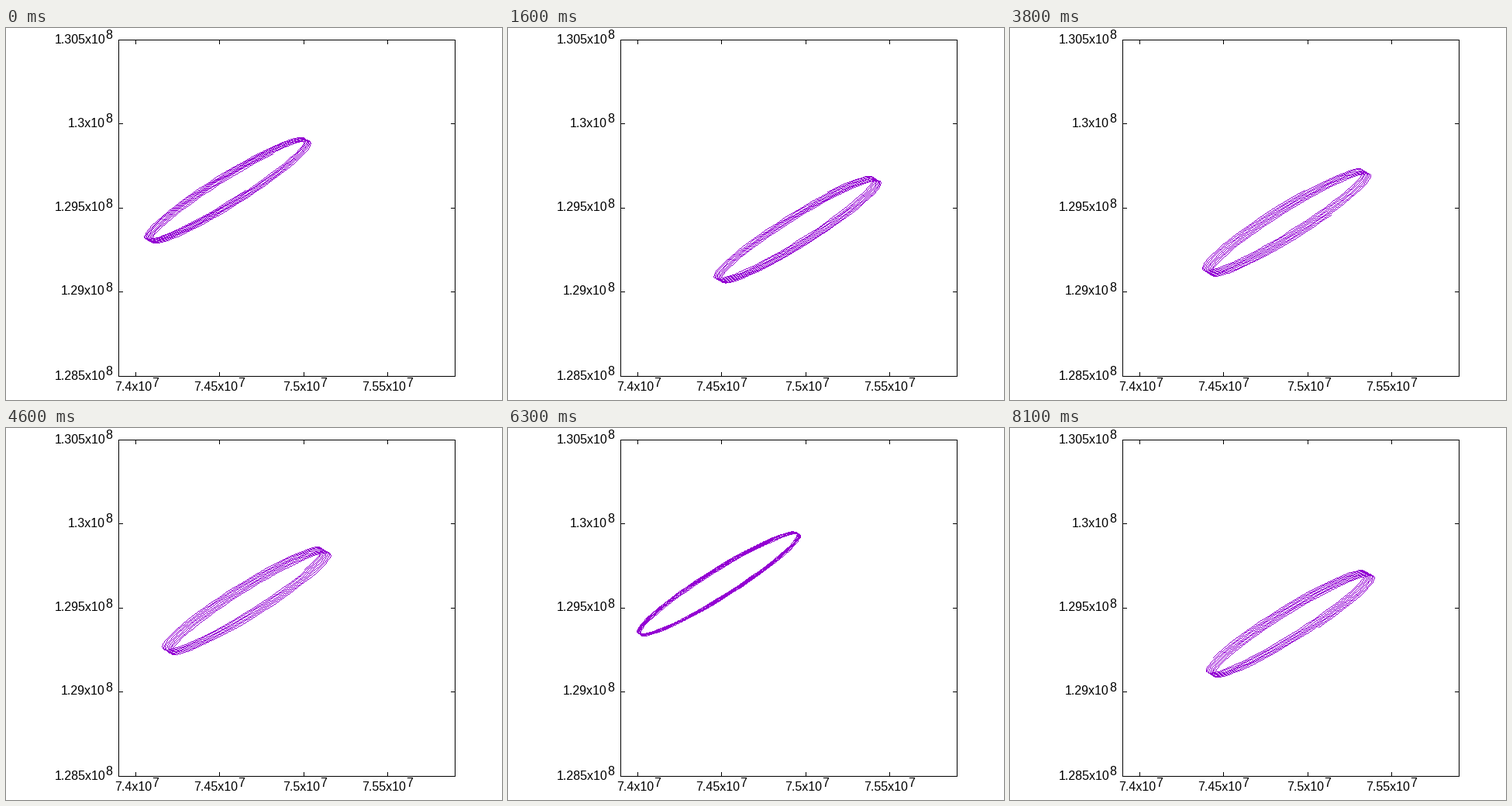
Animation, 640 px wide and 480 px high, one loop 8.2 s. Source, as a matplotlib script:

```python
import numpy as np
import matplotlib.pyplot as plt
from matplotlib.animation import FuncAnimation
from matplotlib.colors import ListedColormap

WIDTH, HEIGHT, DPI = 640, 480, 100
FRAMES, INTERVAL = 82, 100
PX = 72 / DPI
LEFT, RIGHT, TOP, BOTTOM = 145.5, 579.5, 15.5, 449.5
TICK = 5
FONT = "Liberation Sans"
HALF_SPAN = 1.16          # half the trail's duration, in frames
POINTS = 420

fig = plt.figure(figsize=(WIDTH / DPI, HEIGHT / DPI), dpi=DPI, facecolor="white")
ax = fig.add_axes([0, 0, 1, 1])
ax.axis("off")
trail = ax.imshow(np.zeros((HEIGHT, WIDTH)), cmap=ListedColormap(["white", "#9400d3"]),
                  vmin=0, vmax=1, extent=(0, WIDTH, HEIGHT, 0),
                  interpolation="nearest", aspect="auto", zorder=0)
ax.set_xlim(0, WIDTH)
ax.set_ylim(HEIGHT, 0)


def stroke(xs, ys):
    ax.plot(xs, ys, color="black", lw=PX, snap=False,
            solid_capstyle="projecting", solid_joinstyle="miter")


def power_label(x, baseline, mantissa, exponent):
    """Write mantissa x 10^exponent with the exponent starting at x."""
    style = dict(family=FONT, size=16 * PX, color="black", va="baseline")
    ax.text(x, baseline, f"{mantissa}x10", ha="right", **style)
    ax.text(x, baseline - 5, exponent, ha="left", **style)


def draw_frame():
    stroke([LEFT, RIGHT, RIGHT, LEFT, LEFT], [TOP, TOP, BOTTOM, BOTTOM, TOP])
    for x, text in zip((167.5, 275.5, 384.5, 492.5), ("7.4", "7.45", "7.5", "7.55")):
        stroke([x, x], [BOTTOM, BOTTOM - TICK])
        stroke([x, x], [TOP, TOP + TICK])
        power_label(x + (21 if len(text) == 3 else 24), 468, text, "7")
    for y, text in zip((15.5, 123.5, 232.5, 340.5, 449.5),
                       ("1.305", "1.3", "1.295", "1.29", "1.285")):
        stroke([LEFT, LEFT + TICK], [y, y])
        stroke([RIGHT, RIGHT - TICK], [y, y])
        power_label(128, y + 4, text, "8")


def orbit(s):
    """Pixel position at time s (in frames): a fast tilted ellipse on a swaying centre."""
    sway = np.cos(np.radians(-135.5 + 5.335 * s))
    u = np.radians(352.6 - 1183.85 * s)
    x = 331.8 + 64.5 * sway + 103.2 * np.cos(u)
    y = 235.7 + 37.7 * sway - 66 * np.cos(u - np.radians(18))
    return x, y


def rasterize(xs, ys):
    """Plot a polyline as hard one-pixel steps."""
    mask = np.zeros((HEIGHT, WIDTH))
    points = np.rint(np.column_stack([xs, ys])).astype(int)
    for a, b in zip(points, points[1:]):
        steps = np.abs(b - a).max()
        x, y = np.rint(np.linspace(a, b, steps + 1)).astype(int).T
        mask[y, x] = 1
    return mask


def update(frame):
    times = np.linspace(frame - HALF_SPAN, frame + HALF_SPAN, POINTS)
    trail.set_data(rasterize(*orbit(times)))
    return trail,


draw_frame()
anim = FuncAnimation(fig, update, frames=FRAMES, interval=INTERVAL,
                     repeat=True, repeat_delay=0)
plt.show()
```
